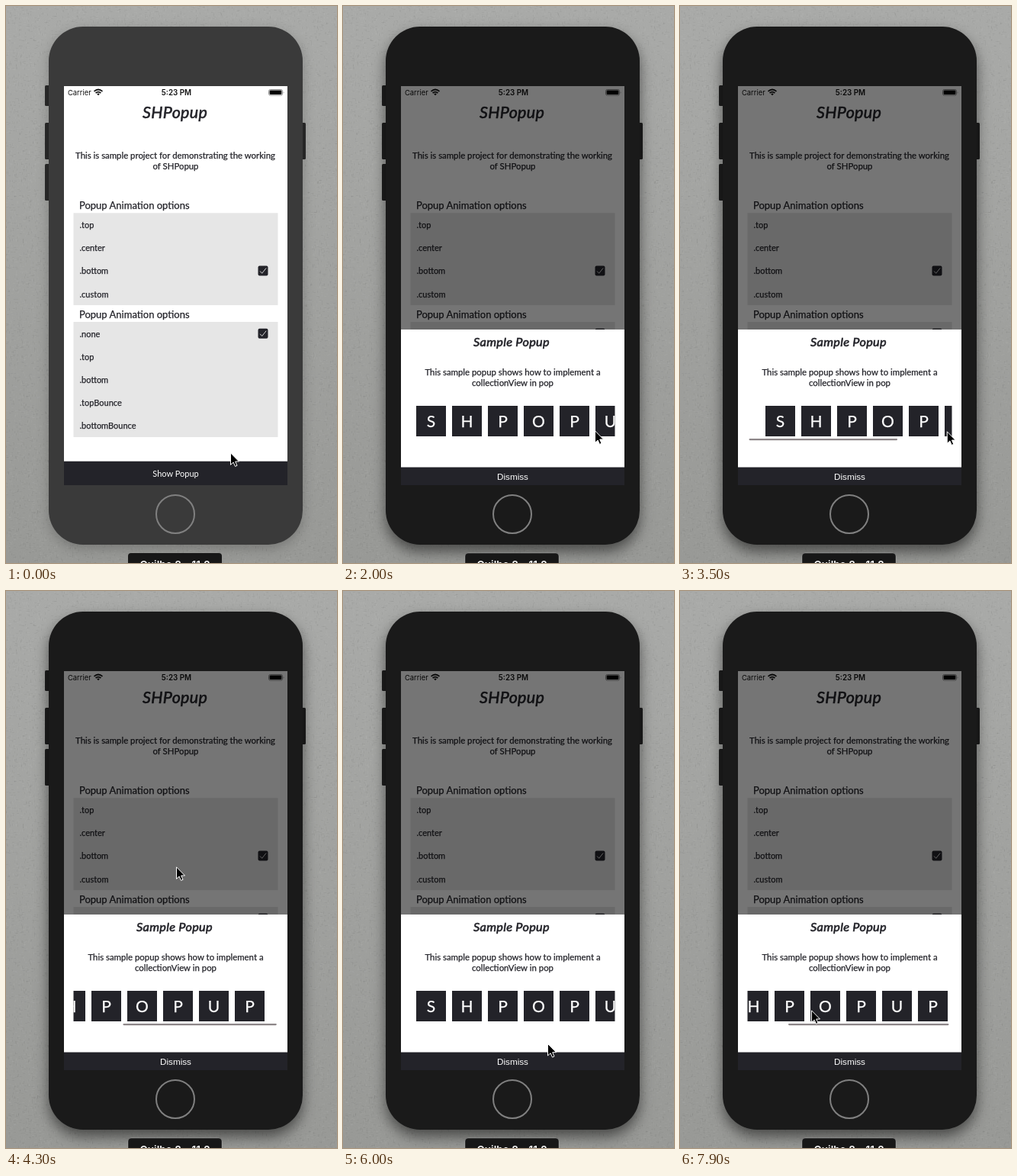
These frames come from a looping animation (434x730 px, 8 s). An HTML page with a canvas:

```html
<!DOCTYPE html>
<html lang="en">
<head>
<meta charset="utf-8">
<title>SHPopup demo</title>
<style>
  html, body { margin: 0; width: 100%; height: 100%; overflow: hidden; background: #a3a4a1; }
  canvas, svg { position: absolute; left: 0; top: 0; display: block; }
  text { font-family: Lato, "Open Sans", sans-serif; fill: #232329; white-space: pre; }
  .mid { text-anchor: middle; }
  .copy, .head, .row { stroke: #232329; stroke-width: .25; }
  .copy { font-size: 11.4px; }
  .head { font-size: 13px; }
  .row { font-size: 11px; }
  .hand { font-style: italic; stroke: #232329; stroke-width: .6; letter-spacing: .3px; }
  .status { font: 400 9.4px Inter, sans-serif; fill: #111; }
  .clock { font-weight: 600; font-size: 9.8px; }
  .light { fill: #fff; stroke: none; }
  .letter { font-size: 21px; fill: #fff; stroke: #fff; stroke-width: .25; }
  .plain { font: 400 11.7px "Liberation Sans", Arial, sans-serif; fill: #fff; }
  .ink { fill: #232329; }
  #body { fill: #3a3a3a; filter: drop-shadow(0 5px 8px rgba(0,0,0,.22)); }
  .keys { fill: #2a2a2a; }
  .active #body { fill: #1a1a1a; filter: drop-shadow(0 9px 9px rgba(0,0,0,.52)); }
  .active .keys { fill: #1e1e1e; }
  .active #tag { stroke: rgba(255,255,255,.25); }
  .pressed #show { fill: #4b4b50; }
</style>
</head>
<body>
<canvas id="wall" width="434" height="730"></canvas>
<svg id="stage" width="434" height="730" viewBox="0 0 434 730">
  <defs>
    <clipPath id="strip"><rect x="88.5" y="520" width="268" height="48"/></clipPath>
    <g id="tick">
      <rect class="ink" width="13" height="13" rx="2"/>
      <path d="M2.6 7 L5.2 9.8 L10.6 3" fill="none" stroke="#e6e6e6" stroke-width=".9"/>
    </g>
  </defs>

  <g class="keys">
    <rect x="51" y="104" width="8" height="27" rx="1.5"/>
    <rect x="51" y="153" width="8" height="48" rx="1.5"/>
    <rect x="51" y="207" width="8" height="48" rx="1.5"/>
    <rect x="385" y="153" width="8" height="48" rx="1.5"/>
  </g>
  <rect id="body" x="56" y="27" width="333" height="679" rx="45"/>
  <circle cx="222" cy="666" r="25" fill="none" stroke="#808080" stroke-width="2"/>
  <rect id="tag" x="160" y="717" width="123" height="30" rx="4" fill="#171717"/>
  <text class="mid light" x="221.5" y="737" style="font:600 13.5px Inter,sans-serif">Quilbo 8 – 11.2</text>

  <rect x="76" y="105" width="293" height="523" fill="#fff"/>
  <text class="status" x="81" y="116.5">Carrier</text>
  <text class="status clock mid" x="223.5" y="116.5">5:23 PM</text>
  <g fill="none" stroke="#111" stroke-width="1.7">
    <path d="M115.5 111.8 Q121 107.2 126.5 111.8"/>
    <path d="M117.6 114 Q121 111.2 124.4 114"/>
  </g>
  <path d="M119.2 115.2 Q121 113.8 122.8 115.2 L121 117.2 Z" fill="#111"/>
  <rect x="344.5" y="109.5" width="18" height="7.6" rx="2" fill="none" stroke="#777" stroke-width=".8"/>
  <rect x="345.6" y="110.6" width="15.8" height="5.4" rx="1" fill="#000"/>
  <path d="M363.8 112 v2.8 q1.3 -1.4 0 -2.8" fill="#777"/>

  <text class="hand" x="179" y="147" font-size="21.5">SHPopup</text>
  <text class="copy mid" x="222" y="200">This is sample project for demonstrating the working</text>
  <text class="copy mid" x="222.5" y="214">of SHPopup</text>
  <g id="lists"></g>
  <rect class="ink" x="76" y="596.7" width="293" height="31.3"/>
  <text id="show" class="mid row light" x="222.5" y="617">Show Popup</text>

  <g id="popup">
    <rect x="76" y="105" width="293" height="523" fill="#000" opacity=".54"/>
    <rect x="76" y="424" width="293" height="181" fill="#fff"/>
    <text class="hand" x="171" y="445.5" font-size="16.3">Sample Popup</text>
    <text class="copy mid" x="222.5" y="484">This sample popup shows how to implement a</text>
    <text class="copy mid" x="222.5" y="498">collectionView in pop</text>
    <g clip-path="url(#strip)"><g id="tiles"></g></g>
    <rect id="bar" y="567" height="2.2" rx="1.1" fill="#8d8688"/>
    <rect class="ink" x="76" y="604.5" width="293" height="23.5"/>
    <text class="plain mid" x="222.5" y="620.5">Dismiss</text>
  </g>

  <path id="cursor" d="M.5 .8 v15.5 l3.6 -3.3 l2.4 5.4 l2.5 -1.1 l-2.3 -5.3 h4.8 Z" fill="#000" stroke="#fff" stroke-linejoin="round"/>
</svg>
<script>
const LOOP = 8000, STEP = 100;
const VIEW = 268, MAX = 69;      // strip width and scroll range
const SPRING = 80;               // settle time constant, ms
const $ = id => document.getElementById(id);
const clamp = (v, lo, hi) => Math.min(hi, Math.max(lo, v));

function paintWall() {
  const c = $('wall').getContext('2d');
  const g = c.createLinearGradient(0, 0, 0, 730);
  g.addColorStop(0, '#a9aaa8');
  g.addColorStop(1, '#989996');
  c.fillStyle = g;
  c.fillRect(0, 0, 434, 730);
  // faint woven grain
  let seed = 7;
  const rnd = () => (seed = seed * 16807 % 2147483647) / 2147483647;
  for (let i = 0; i < 20000; i++) {
    c.fillStyle = rnd() < .5 ? 'rgba(255,255,255,.035)' : 'rgba(0,0,0,.035)';
    const across = rnd() < .5;
    c.fillRect(rnd() * 434 | 0, rnd() * 730 | 0, across ? 3 : 1, across ? 1 : 3);
  }
}

function listMarkup(top, rows, checked) {
  const pitch = 30.2;
  return `<text class="head" x="96" y="${top - 5.5}">Popup Animation options</text>
    <rect x="88.5" y="${top}" width="268" height="${rows.length * pitch}" fill="#e6e6e6"/>` +
    rows.map((name, i) =>
      `<text class="row" x="96.5" y="${top + 19.6 + i * pitch}">.${name}</text>`).join('') +
    `<use href="#tick" x="330.5" y="${top + 8.8 + checked * pitch}"/>`;
}

function tilesMarkup(word) {
  return [...word].map((ch, i) => {
    const x = 96 + i * 47;
    return `<rect class="ink" x="${x}" y="524" width="39" height="40"/>
      <text class="letter mid" x="${x + 19.5}" y="552.3">${ch}</text>`;
  }).join('');
}

// pointer stops: time, x, y
const stops = [
  [0, 294, 585], [500, 289, 610], [1500, 289, 610], [2000, 330, 556],
  [2300, 330, 558], [2700, 86, 548], [3200, 250, 551], [3600, 383, 559],
  [4000, 328, 553], [4100, 264, 540], [4300, 223, 361], [4800, 231, 378],
  [5200, 277, 545], [5400, 264, 614], [5700, 264, 614], [6600, 276, 550],
  [6900, 220, 547], [7100, 85, 546], [7800, 169, 549], [7900, 172, 549]
];

// each showing of the popup, with the drags made in it
const showings = [
  { open: 1500, close: 4600, drags: [
    { from: 2300, to: 2700, base: 0 },
    { from: 3200, to: 3600, base: MAX },
    { from: 4000, to: 4100, base: 0 }] },
  { open: 5700, close: LOOP, drags: [
    { from: 6600, to: 7100, base: 0 },
    { from: 7800, to: 7900, base: MAX }] }
];

function pointer(t) {
  const i = stops.findIndex(s => s[0] > t);
  if (i < 0) return stops[stops.length - 1].slice(1);
  const [t0, x0, y0] = stops[i - 1], [t1, x1, y1] = stops[i];
  const u = (t - t0) / (t1 - t0);
  return [x0 + (x1 - x0) * u, y0 + (y1 - y0) * u];
}

// rubber band beyond either end
function stretch(raw) {
  const edge = clamp(raw, 0, MAX), pull = .55 * Math.abs(raw - edge);
  return edge + Math.sign(raw - edge) * pull * VIEW / (VIEW + pull);
}

function dragged(drag, t) {
  return stretch(drag.base + pointer(drag.from)[0] - pointer(t)[0]);
}

// follows the finger, then a critically damped spring takes over
function scrollOffset(drag, t) {
  if (!drag) return 0;
  if (t <= drag.to) return dragged(drag, t);
  const end = dragged(drag, drag.to);
  const speed = (end - dragged(drag, drag.to - 20)) / 20;
  const rest = clamp(end + speed * 300, 0, MAX);
  const dt = t - drag.to, d = end - rest;
  return rest + (d + (speed + d / SPRING) * dt) * Math.exp(-dt / SPRING);
}

function drawStrip(drag, t) {
  const offset = scrollOffset(drag, t);
  const inside = clamp(offset, 0, MAX), over = Math.abs(offset - inside);
  $('tiles').setAttribute('transform', `translate(${-Math.round(offset)} 0)`);
  $('bar').setAttribute('x', 90.5 + inside * .78 + (offset > MAX ? over : 0));
  $('bar').setAttribute('width', 210.5 - over);
  $('bar').setAttribute('opacity', drag ? clamp((drag.to + 900 - t) / 200, 0, 1) : 0);
}

function draw(t) {
  const showing = showings.find(s => t >= s.open && t < s.close);
  const stage = $('stage').classList;
  stage.toggle('active', t >= 1300);
  stage.toggle('pressed', showings.some(s => t >= s.open - 100 && t < s.open));
  $('popup').style.display = showing ? '' : 'none';
  if (showing) drawStrip(showing.drags.filter(d => d.from <= t).pop(), t);
  $('cursor').setAttribute('transform', `translate(${pointer(t)})`);
}

paintWall();
$('lists').innerHTML =
  listMarkup(271.3, ['top', 'center', 'bottom', 'custom'], 2) +
  listMarkup(414, ['none', 'top', 'bottom', 'topBounce', 'bottomBounce'], 0);
$('tiles').innerHTML = tilesMarkup('SHPOPUP');

function tick() {
  draw(Math.floor(performance.now() % LOOP / STEP) * STEP);
  requestAnimationFrame(tick);
}
tick();
</script>
</body>
</html>
```
